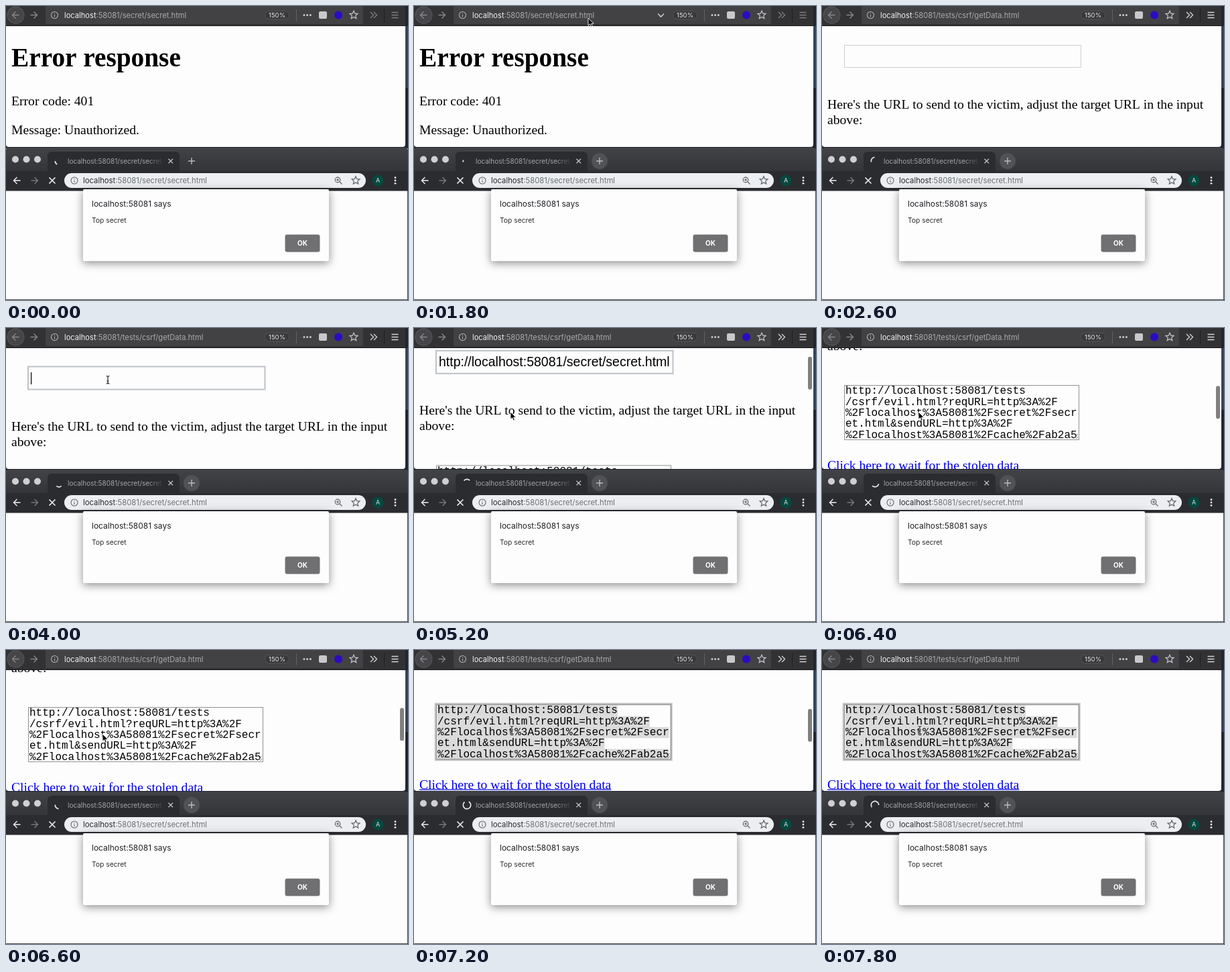
An HTML page with a canvas for the animation above (8000 ms loop, 600 by 438 pixels).

```html
<!DOCTYPE html>
<html lang="en">
<head>
<meta charset="utf-8">
<title>Two browser windows</title>
<style>
  html, body { margin: 0; width: 100%; height: 100%; overflow: hidden; background: #fff; }
  canvas { display: block; }
</style>
</head>
<body>
<canvas id="stage" width="600" height="438"></canvas>
<script>
const ctx = document.getElementById('stage').getContext('2d');
const LOOP = 8000, STEP = 200;
const SANS = 'Inter, Roboto, sans-serif';
const SERIF = '"Liberation Serif", serif';
const MONO = '"Liberation Mono", monospace';
const HOST = 'localhost';
const SECRET_PATH = ':58081/secret/secret.html';
const DATA_PATH = ':58081/tests/csrf/getData.html';
const EMPTY_LINES = ['http://localhost:58081/tests', '/csrf/evil.html?reqURL=&sendURL=http',
  '%3A%2F', '%2Flocalhost%3A58081%2Fcache%2Fab2a5'];
const FULL_LINES = ['http://localhost:58081/tests', '/csrf/evil.html?reqURL=http%3A%2F',
  '%2Flocalhost%3A58081%2Fsecret%2Fsecr', 'et.html&sendURL=http%3A%2F',
  '%2Flocalhost%3A58081%2Fcache%2Fab2a5'];

// Each key is [time, value, value, ...].
const SCROLL = [[5000, 0], [5600, 71], [6000, 71], [6400, 143], [6800, 143], [7000, 147]];
const MOUSE = [[400, 283, 272], [800, 277, 230], [1200, 263, 24], [1800, 260, 18],
  [2400, 258, 16], [3000, 250, 40], [3600, 152, 77], [4800, 152, 77], [5200, 144, 125],
  [6600, 144, 125], [7000, 146, 119]];
const SPINNER = [[0, 120, 60], [1800, 885, 30], [2600, 1245, 100], [4000, 1850, 80],
  [5600, 2555, 10], [6600, 2975, 90], [7800, 3385, 215]];

function segment(keys, t) {
  let i = 0;
  while (i < keys.length - 2 && t >= keys[i + 1][0]) i++;
  const a = keys[i], b = keys[i + 1];
  const u = Math.min(1, Math.max(0, (t - a[0]) / (b[0] - a[0])));
  return { u, span: b[0] - a[0], values: a.slice(1).map((v, k) => v + (b[k + 1] - v) * u) };
}
const between = (t, a, b) => t >= a && t < b;

function rect(x, y, w, h, color) {
  ctx.fillStyle = color;
  ctx.fillRect(x, y, w, h);
}
function round(x, y, w, h, r, color) {
  ctx.fillStyle = color;
  ctx.beginPath();
  ctx.roundRect(x, y, w, h, r);
  ctx.fill();
}
function frame(x, y, w, h, color, width = 1) {
  ctx.strokeStyle = color;
  ctx.lineWidth = width;
  ctx.strokeRect(x, y, w, h);
}
function disc(x, y, r, color) {
  round(x - r, y - r, 2 * r, 2 * r, r, color);
}
function line(d, color, width = 1.3) {
  ctx.strokeStyle = color;
  ctx.lineWidth = width;
  ctx.stroke(new Path2D(d));
}
function text(str, x, y, size, color, family = SANS, weight = 400) {
  ctx.font = `${weight} ${size}px ${family}`;
  ctx.fillStyle = color;
  ctx.fillText(str, x, y);
  return x + ctx.measureText(str).width;
}
function address(path, x, y, size, hostColor, pathColor) {
  text(path, text(HOST, x, y, size, hostColor), y, size, pathColor);
}
function infoIcon(x, y, color) {
  line(`M${x - 5} ${y}a5 5 0 1 0 10 0a5 5 0 1 0 -10 0M${x} ${y - 0.6}v3.4M${x} ${y - 3}v1.2`, color, 1.1);
}
function star(x, y, color) {
  let d = '';
  for (let i = 0; i < 10; i++) {
    const r = i % 2 ? 2.9 : 6.3, a = (i / 5 - 0.5) * Math.PI;
    d += `${i ? 'L' : 'M'}${x + r * Math.cos(a)} ${y + r * Math.sin(a)}`;
  }
  line(d + 'Z', color, 1.2);
}
function arrow(x, y, dir, color) {
  line(`M${x - 5 * dir} ${y}H${x + 5 * dir}M${x} ${y - 5}L${x + 5 * dir} ${y}L${x} ${y + 5}`, color, 1.4);
}

function errorPage() {
  text('Error response', 8, 90, 39.3, '#000', SERIF, 700);
  text('Error code: 401', 8, 147.5, 19.65, '#000', SERIF);
  text('Message: Unauthorized.', 8, 190.5, 19.65, '#000', SERIF);
}

function textArea(t) {
  const focused = t >= 7000, selected = t >= 7200;
  if (focused) frame(32.5, 227.5, 351.5, 83, '#c0c2c4', 3.5);
  frame(33.5, 228.5, 350, 81, '#929292');
  ctx.save();
  ctx.beginPath();
  ctx.rect(34, 229, 349, 80);
  ctx.clip();
  (t < 6000 ? EMPTY_LINES : FULL_LINES).forEach((str, i) => {
    const y = 241.3 + i * 16.3;
    if (selected) rect(35, y - 12, str.length * 9.6, 16.3, '#dadadb');
    text(str, 35, y, 16, '#000', MONO);
  });
  ctx.restore();
  line('M375 308l7 -7M379 308l3 -3', '#777', 0.9);
}

function dataPage(t, scroll) {
  ctx.save();
  ctx.translate(0, -scroll);
  if (between(t, 3600, 5800)) frame(33, 57.5, 353.5, 34, '#bcc2c7', 2);
  else frame(33.5, 58.5, 353, 33, '#cfcfcf');
  const pasted = t >= 4600;
  if (pasted) text('http://localhost:58081/secret/secret.html', 37, 81, 19.5, '#000', '"Liberation Sans", sans-serif');
  else if (between(t, 3600, 4600) && t % 1000 < 600) rect(37, 66, 1.2, 18, '#000');
  text("Here's the URL to send to the victim, adjust the target URL in the input", 8, 152.8, 19.65, '#000', SERIF);
  text('above:', 8, 176, 19.65, '#000', SERIF);
  textArea(t);
  const end = text('Click here to wait for the stolen data', 8, 353.5, 19.65, '#0000e0', SERIF);
  rect(8, 354.5, end - 8, 1.2, '#0000e0');
  ctx.restore();
  if (between(t, 5000, 7400)) round(588, 34 + scroll * 0.366, 6, 49, 3, '#808082');
}

function upperWindow(t) {
  const loaded = t >= 2600, pale = '#c9c9cb', dim = '#7d7d80';
  rect(0, 0, 600, 212, '#20252e');
  rect(596, 30, 4, 92, '#34445c');
  round(0, 29, 596, 181, [0, 0, 4, 4], '#fefdfe');
  ctx.save();
  ctx.beginPath();
  ctx.rect(0, 30, 596, 180);
  ctx.clip();
  if (loaded) dataPage(t, segment(SCROLL, t).values[0]);
  else errorPage();
  ctx.restore();

  rect(0, 0, 596, 30, '#323234');
  rect(0, 29, 596, 1, '#1d1d1f');
  round(59, 0, 474, 27, 2, '#424245');
  disc(14.5, 13.5, 13, '#5a5a5d');
  disc(14.5, 13.5, 12, '#464649');
  arrow(14.5, 13.5, -1, '#88888a');
  arrow(41.5, 13.5, 1, '#87878a');
  infoIcon(72.5, 13.5, '#b0b0b2');
  address(loaded ? DATA_PATH : SECRET_PATH, 87, 17.5, 11.13, '#f2f2f3', '#ababae');
  if (between(t, 1200, 2600)) line('M364 11.5l4.5 4.5l4.5 -4.5', pale, 1.6);
  round(386, 7, 37, 13, 6.5, '#525255');
  round(387, 8, 35, 11, 5.5, '#39393c');
  text('150%', 392, 17.2, 9.6, '#e4e4e5');
  rect(433, 5, 1, 18, '#626265');
  for (const x of [445, 449.7, 454.4]) disc(x, 13.5, 1.5, pale);
  round(467, 8, 12, 11, 2, pale);
  disc(496, 13.5, 6, '#2c0bc2');
  star(519, 13.5, pale);
  const active = loaded ? '#d4d4d6' : dim;
  line('M544 9l4.5 4.5l-4.5 4.5M549 9l4.5 4.5l-4.5 4.5', active, 1.4);
  rect(564, 4, 1, 21, '#1f1f21');
  line('M575.5 9.5h10M575.5 13.5h10M575.5 17.5h10', active, 1.4);
}

function spinner(t) {
  const { u, span, values: [start, base] } = segment(SPINNER, t);
  const cycles = Math.max(1, Math.round(span / 1332));
  const sweep = base + 70 * (1 - Math.cos(2 * Math.PI * cycles * u));
  ctx.strokeStyle = '#e8e8ea';
  ctx.lineWidth = 1.7;
  ctx.beginPath();
  ctx.arc(79, 231, 5.7, start * Math.PI / 180, (start + sweep) * Math.PI / 180);
  ctx.stroke();
}

function dialog() {
  ctx.save();
  ctx.shadowColor = 'rgba(0,0,0,.45)';
  ctx.shadowBlur = 13;
  ctx.shadowOffsetY = 3;
  round(115, 273, 367, 107, 2, '#fefdfe');
  ctx.restore();
  text('localhost:58081 says', 128, 299, 12, '#202124');
  text('Top secret', 128, 323, 10.3, '#2b2c2f');
  round(416.5, 340.5, 52, 26, 3, '#707072');
  text('OK', 435, 357, 10, '#fff', SANS, 700);
}

function lowerWindow(t) {
  const strip = ctx.createLinearGradient(0, 211, 0, 246);
  strip.addColorStop(0, '#424347');
  strip.addColorStop(1, '#343539');
  round(0, 211, 600, 227, [4, 4, 0, 0], strip);
  rect(0, 275, 599, 162, '#fefdfe');
  rect(599, 275, 1, 163, '#46474a');
  rect(0, 437, 600, 1, '#46474a');
  rect(0, 246, 600, 29.5, '#2b2c30');
  round(62, 217, 197, 30, [6, 6, 0, 0], '#2b2c30');
  for (const x of [14, 30.5, 47]) disc(x, 228.5, 5, '#d0d0d2');
  spinner(t);

  const fade = ctx.createLinearGradient(212, 0, 236, 0);
  fade.addColorStop(0, '#a3a4a8');
  fade.addColorStop(1, 'rgba(163,164,168,0)');
  ctx.save();
  ctx.beginPath();
  ctx.rect(90, 220, 146, 24);
  ctx.clip();
  text(HOST + SECRET_PATH, 92, 234.5, 10, fade);
  ctx.restore();

  line('M242.5 227.7l6.5 6.5M249 227.7l-6.5 6.5', '#c0c1c4', 1.3);
  if (t >= 800) disc(277, 231, 12, '#515256');
  line('M272 231h10M277 226v10', '#b9babd', 1.4);

  arrow(16.5, 260, -1, '#f0f0f1');
  arrow(42.5, 260, 1, '#77787b');
  line('M64.5 255.5l9 9M73.5 255.5l-9 9', '#f0f0f1', 1.6);
  round(87, 249, 450, 22, 11, '#eceef1');
  infoIcon(102, 260, '#5f6368');
  address(SECRET_PATH, 115, 264, 11.3, '#27282b', '#6d7074');
  line('M491.2 259a3.8 3.8 0 1 0 7.6 0a3.8 3.8 0 1 0 -7.6 0M498 262l3.5 3.5M493 259h4M495 257v4', '#5f6368', 1.2);
  star(522, 260, '#5f6368');
  disc(555, 260, 8.5, '#06483f');
  text('A', 551.9, 263.4, 9, '#d6e2df');
  for (const y of [255.7, 260, 264.3]) disc(581, y, 1.4, '#f0f0f1');
  dialog();
}

function mouse(t) {
  if (!(between(t, 400, 2600) || between(t, 3000, 4400) || t >= 5000)) return;
  const [x, y] = segment(MOUSE, t).values;
  ctx.save();
  ctx.translate(x, y);
  if (between(t, 3400, 4400) || t >= 6800) {
    const beam = 'M-2.5 -5.5Q0 -5.5 0 -4Q0 -5.5 2.5 -5.5M0 -4V4.5M-2.5 6Q0 6 0 4.5Q0 6 2.5 6M-1.5 2h3';
    line(beam, '#fff', 2.4);
    line(beam, '#111', 1.1);
  } else {
    const pointer = new Path2D('M0 0V11.2L2.6 8.8L4.5 13L6.4 12.2L4.6 8.2H8.2Z');
    ctx.fillStyle = '#000';
    ctx.fill(pointer);
    ctx.strokeStyle = '#fff';
    ctx.lineWidth = 0.9;
    ctx.stroke(pointer);
  }
  ctx.restore();
}

function draw(now) {
  const t = Math.floor((now % LOOP) / STEP) * STEP;
  upperWindow(t);
  lowerWindow(t);
  mouse(t);
  requestAnimationFrame(draw);
}
requestAnimationFrame(draw);
</script>
</body>
</html>
```
